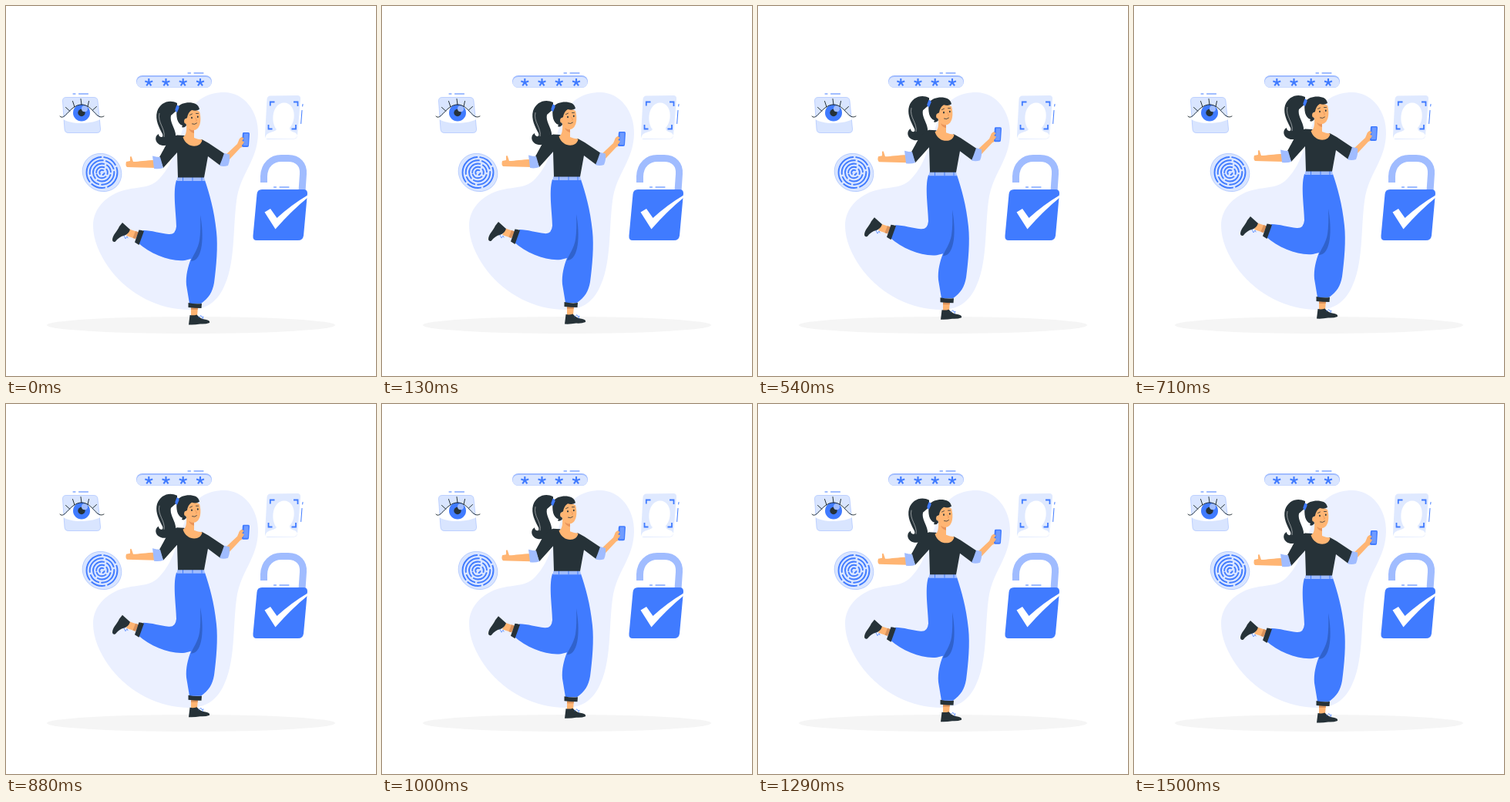
Recreate the animation shown at these times as an HTML page. Size 480 px wide and 480 px high, loop 1.54 s.

```html
<!DOCTYPE html>
<html lang="en">
<head>
<meta charset="utf-8">
<style>
html, body { margin: 0; width: 100%; height: 100%; overflow: hidden; background: #fff; }
svg { display: block; width: 100vw; height: 100vh; }
.blue { fill: #407bff; } .mid { fill: #a0bcff; } .pale { fill: #d9e5ff; }
.dark { fill: #263238; } .skin { fill: #ffb573; } .white { fill: #fff; }
.line { fill: none; stroke: #407bff; stroke-width: 1; stroke-linecap: round; }
.ink { fill: none; stroke: #263238; stroke-width: 1; stroke-linecap: round; }
.edge { stroke: #a0bcff; stroke-width: .6; }
</style>
</head>
<body>
<svg viewBox="0 0 480 480">
  <ellipse cx="240" cy="414" rx="187" ry="11" fill="#f5f5f5"/>
  <path fill="#ebf0ff" d="M283 112C309 112 328 137 327 166C326 202 304 216 299 253C294 291 298 336 281 368C272 385 258 394 238 394C198 394 160 374 136 343C121 323 113 303 113 285C113 262 131 245 153 239C172 234 187 237 199 224C220 202 223 172 236 142C245 121 262 112 283 112Z"/>

  <g id="password">
    <rect x="169" y="90" width="98" height="16" rx="8" class="mid"/>
    <rect x="169.5" y="92" width="97" height="13.700" rx="6.800" class="pale"/>
    <path class="line" d="M236 87h3.500M244 87h12"/>
  </g>

  <g id="eye">
    <path class="pale edge" d="M78 118.500H114Q118.500 118.500 119 123L122.500 159Q123 164.500 118 164.500H81Q76.500 164.500 76 160L73.500 123Q73.500 118.500 78 118.500Z"/>
    <path class="white" d="M73 146C81 142 86 128 98 128C111 128 114 143 124 146C114 153 84 155 73 146Z"/>
    <circle cx="98" cy="138.500" r="11" class="blue"/>
    <circle cx="98" cy="138.500" r="4.700" class="dark"/>
    <circle cx="102" cy="133.300" r="4" class="mid"/>
    <path class="ink" d="M70 143C76 150 83 128 98 128C113 128 117 149 127 143M97 120.500L98 128M86.500 123.500L89 131M107.500 123.500L106 130.500M77.500 131.500L83 136.500M117.500 130.500L112.500 135"/>
    <path class="line" d="M87 114h3M94.500 114h12"/>
  </g>

  <g id="print">
    <ellipse cx="124.500" cy="216" rx="26" ry="24" transform="rotate(35 124.500 216)" class="pale edge"/>
  </g>

  <g id="face">
    <path fill="#dfe9ff" d="M343 116.500L378 116Q382.500 116 382 121L378 168Q377.500 172.500 373 172.500L340 173Q336 173 336 168L338.500 121Q339 116.500 343 116.500Z"/>
    <path class="white" d="M336.500 172C337 162 348 165 351 160C343 151 345 126 361 125.500C376 126 377 149 368 158C368 165 377 162 378 168Q377 172 373 172Z"/>
    <path class="line" style="stroke-width:1.800;stroke-linecap:butt" d="M342.800 129.500V124.500H348.500M373 124.500H378.500V130M340.500 154V159.500H345.500M370.500 159.500H376V154"/>
    <path class="line" d="M385 127.500L384.700 130M384 135.500L382.700 152.500"/>
  </g>

  <g id="lock">
    <path d="M334.500 229V221C335 206 345 197.500 357 197.500H366C379 197.500 386.500 206 385.500 218L384 240" fill="none" stroke="#a0bcff" stroke-width="9"/>
    <path class="blue" d="M332 238H386Q391 238 391 243L386 298Q385 304 379 304H325Q320 304 320.500 298L325.500 244Q326 238 332 238Z"/>
    <path class="white" d="M335.500 267.500L343 263L351.500 275Q370 258 392 245V248Q369 267 349.500 289.500Z"/>
    <path class="line" d="M347.500 235h3M355 235h12"/>
  </g>

  <g id="woman">
    <path class="dark" d="M222 126C212 121 200 125 196 137C193 148 199 158 203 166C205 172 198 171 198 166C192 169 193 179 203 181C214 182 221 175 220 166C219 158 212 150 214 142L222 135Z"/>
    <path fill="none" stroke="#fff" stroke-width=".5" d="M199 139C196 151 207 159 205 170"/>

    <path class="skin" d="M194 200C181 200 173 202 165 202L163 196Q162 194 161 196L161 201L156 202Q154.500 207 157 209C168 209 181 210 194 210Z"/>
    <path class="skin" d="M284 194L300 179L303 172Q306 169 308 170L309 177Q308 183 304 184L289 200Z"/>
    <path class="blue" d="M308 164H314.500Q316 164 316 166L315 181Q315 183 313 183H307.500Q306 183 306 181L306.800 166Q307 164 308 164Z"/>
    <path fill="#6f9bff" d="M309 165.500H314.500L313.800 181H308Z"/>
    <path class="skin" d="M302 174L307 170.500L308.500 172L306 175L309 176L307 180L303 181Z"/>

    <path class="blue" d="M221 226C216 242 221 270 221 286Q220 297 211 296C200 295 189 291 178 291L171 307C188 322 213 332 232 330L240 328C236 338 233 350 234 362L238 386H253C263 379 268 371 270 359C273 337 275 312 273 293C270 264 264 244 258 226Z"/>
    <path fill="#3062cc" d="M252 271C257 297 256 331 240 331C242 324 249 316 251 304Q253 291 252 271Z"/>
    <path class="mid" d="M222.500 222H257L258 227H221.500Z"/>
    <path class="line" style="stroke-linecap:butt" d="M229.500 222V227M242 222V227M254 222V227"/>

    <path class="dark" d="M222 167.500L231 168Q243 180 254 173L263 178L284 192L278 207L262 195L257 222.500H223L222 190L204 210L199 196C206 185 210 171 222 167.500Z"/>
    <path class="mid" d="M190 194.500Q196 196 200 196L204 210Q199 212 192 211Q191 202 190 194.500Z"/>
    <path class="mid" d="M283 191L290 192.500Q291 200 288 207Q282 209 277 207Q280 200 283 191Z"/>

    <path class="skin" d="M234 153L244 159V171Q249 173 254.500 173.500C253 185 234 185 229.500 170Q235 168 234 153Z"/>
    <path class="skin" d="M234 139Q242 131 251 137C254 148 252 160 244 161C238 161 233 155 233 149Z"/>
    <path fill="#e8935a" d="M237 159Q241 162 244 161L244 165Q239 164 237 159Z"/>
    <path class="dark" d="M222 132C227 125 239 124 246 127Q250 129 251 134Q247 137 241 135Q236 138 235 145L232 147L234 155Q231 159 228 157L229 155C222 153 220 143 222 132Z"/>
    <ellipse cx="233.500" cy="149.500" rx="2.400" ry="3.200" class="skin"/>
    <path class="blue" d="M221.500 128.500Q225 129 224.500 132L222 138Q219 137 219.500 134Z"/>
    <ellipse cx="241" cy="145" rx=".9" ry="1.300" class="dark"/>
    <ellipse cx="248.800" cy="143.800" rx=".9" ry="1.300" class="dark"/>
    <path class="ink" style="stroke-width:.8" d="M238.500 141.500L241.500 140M246.500 139.500L249.500 139.500M241.500 153Q245 154.500 247.500 152"/>
    <path fill="none" stroke="#e8935a" stroke-width=".8" d="M245.500 145L247.500 148.500L246 149.300"/>

    <path class="skin" d="M160 289.500L172 293.500L168 302L156 298Z"/>
    <path fill="#d9925c" d="M168 292L172 293.500L168 302L164.500 301Z"/>
    <path class="dark" d="M172.500 290.500Q176 290.500 179 292L172.500 310L167 306.500Z"/>
    <path class="dark" d="M151 281L161 290Q159 296 153 298Q147 299 142 305.500Q139 307 138 304C138 297 144 293 147 286Z"/>
    <path class="line" style="stroke-width:.7" d="M153 298L155 302L157 299L158 301"/>

    <path class="skin" d="M240 390H249L248 402H240Z"/>
    <path fill="#d9925c" d="M240 390H249L248.700 394H240Z"/>
    <path class="dark" d="M236.500 385Q245 387 254 386L253.500 392Q245 392 236.500 391Z"/>
    <path class="dark" d="M238.500 401Q243 402 247.500 400.500Q252 406 260 407Q265 408 264 411Q259 413 252 412.500Q244 414 237 413.500Z"/>
    <path class="line" style="stroke-width:.7" d="M250 404L253 401.500L254 404L256 403L255 406"/>
  </g>
</svg>
<script>
const PERIOD = 1540, LIFT = 8, LEAD = 40;
const add = (id, d, width, dash, cap = 'round') => {
  const path = document.createElementNS('http://www.w3.org/2000/svg', 'path');
  path.setAttribute('class', 'line');
  path.setAttribute('d', d);
  path.style.strokeWidth = width;
  path.style.strokeLinecap = cap;
  if (dash) path.style.strokeDasharray = dash;
  document.getElementById(id).append(path);
};

for (const x of [185.3, 207.5, 229.7, 252]) {
  let spokes = '';
  for (let i = 0; i < 5; i++) {
    const a = i * Math.PI * .4 - Math.PI / 2;
    spokes += `M${x} 99.2L${x + 5.2 * Math.cos(a)} ${99.2 + 5.2 * Math.sin(a)}`;
  }
  add('password', spokes, 2.1, '', 'butt');
}

[20, 15.8, 11.5, 7.3, 3.2].forEach((r, i) => {
  const d = `M${124.5 - r} 216a${r} ${r} 0 1 1 ${2 * r} 0a${r} ${r} 0 1 1 ${-2 * r} 0`;
  add('print', d, 1.9, `${r * (1.5 + i * .15)} 4 ${r * .9} 4`);
});

const woman = document.getElementById('woman');
const draw = now => {
  const phase = (now + LEAD) / PERIOD * 2 * Math.PI;
  woman.setAttribute('transform', `translate(0 ${-LIFT * (1 - Math.cos(phase)) / 2})`);
};
const start = performance.now();
const frame = () => {
  draw(performance.now() - start);
  requestAnimationFrame(frame);
};
frame();
</script>
</body>
</html>
```
